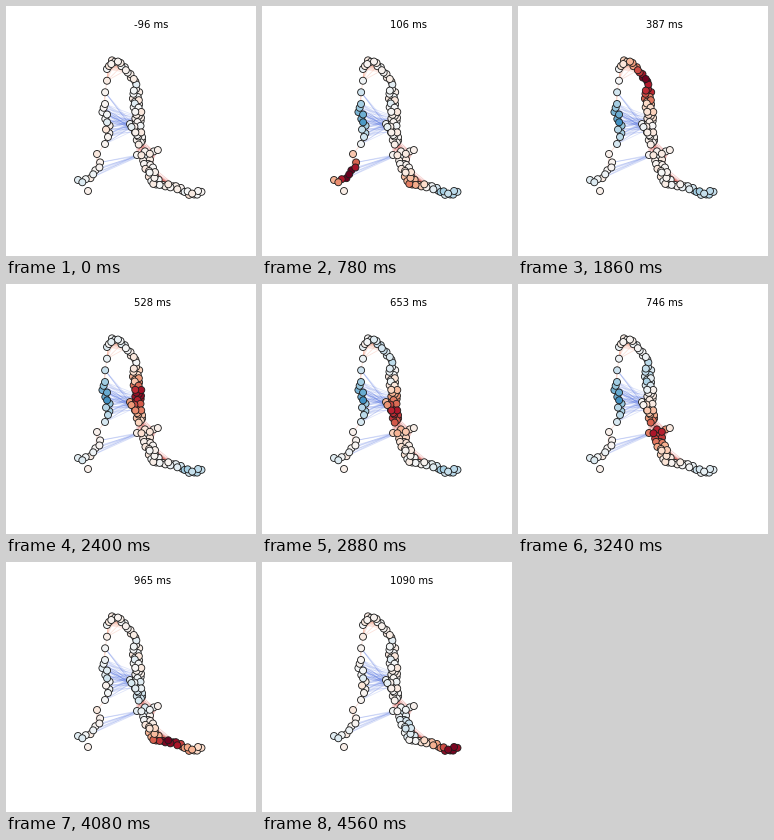
Animation, 250 px wide and 250 px high, one loop 4620 ms. Source, as a matplotlib script:

```python
import numpy as np
import matplotlib.pyplot as plt
from matplotlib.animation import FuncAnimation
from matplotlib.collections import LineCollection

SIZE = 250
FRAMES = 77
PX = 0.72  # points per pixel at 100 dpi
START_MS, STEP_MS = -96.875, 15.625

rng = np.random.default_rng(4)


def strand(count, spread, *corners):
    """Nodes at even steps along a polyline, zigzagging to both sides."""
    corners = np.array(corners, float)
    lengths = np.hypot(*np.diff(corners, axis=0).T)
    marks = np.concatenate([[0], lengths.cumsum()])
    steps = np.linspace(0, marks[-1], count)
    line = np.column_stack([np.interp(steps, marks, corners[:, k]) for k in (0, 1)])
    direction = np.gradient(line, axis=0)
    direction /= np.hypot(*direction.T)[:, None]
    normal = direction[:, ::-1] * [-1, 1]
    return line + normal * (spread * np.sin(2.4 * np.arange(count)))[:, None]


# Stage pixels, y pointing down
foot = strand(8, 1.2, (72, 174), (78, 176), (87, 169), (95, 157))
stray = np.array([[82.0, 185.0]])
shin = strand(2, 0, (91, 148), (99, 138))
knee = strand(9, 2, (102, 131), (102, 118), (97, 102))
thigh = strand(4, 0, (99, 98), (99, 87), (101, 75), (101, 63))
arch = strand(15, 1, (103, 60), (107, 54.5), (113, 56), (121, 65), (131, 78))
column = strand(36, 3.2, (130, 83), (130, 98), (133, 110), (131, 122), (135, 138))
hub = strand(4, 1, (124, 118), (130, 126))
shelf = strand(6, 1.8, (131, 149), (140, 147), (152, 145))
slope = strand(19, 4, (139, 152), (145, 166), (151, 180))
tail = strand(17, 1.5, (157, 179), (170, 181), (182, 187), (188, 189), (195, 185))

nodes = rng.permutation(np.vstack([
    foot, stray, shin, knee, thigh, arch, column, hub, shelf, slope, tail]))

# Position of each node along the course of the travelling wave
course = np.array([
    (72, 174), (88, 167), (97, 152), (101, 125), (98, 100), (102, 62),
    (112, 55), (128, 74), (131, 95), (132, 111), (132, 130), (139, 148),
    (149, 162), (149, 179), (170, 182), (190, 188)], float)
stops = np.arange(len(course))
fine = np.linspace(0, stops[-1], 1500)
fine_xy = np.column_stack([np.interp(fine, stops, course[:, k]) for k in (0, 1)])
gaps = np.hypot(*(nodes[:, None] - fine_xy[None]).transpose(2, 0, 1))
along = fine[gaps.argmin(axis=1)]
closeness = np.exp(-(gaps.min(axis=1) / 10) ** 4)
jitter = rng.normal(0.03, 0.05, len(nodes))


def pulse(x, centre, width):
    return np.exp(-((x - centre) / width) ** 2)


def ramp(ms, begin, end):
    x = np.clip((ms - begin) / (end - begin), 0, 1)
    return x * x * (3 - 2 * x)


def activity(ms):
    centre = np.interp(ms, [-97, 106, 262, 528, 653, 840, 1090],
                       [0, 0.9, 5.4, 9, 9.9, 12.1, 15.2])
    height = np.interp(ms, [-97, 106, 700, 1090], [0, 0.85, 0.45, 0.75])
    crest = height * pulse(along, centre, 0.85)
    halo = 0.25 * ramp(ms, -97, 106) * pulse(along, centre, 1.7)
    heel = 0.45 * pulse(along, 13, 0.6) * pulse(ms, 106, 110)

    knee_dip = ramp(ms, -97, 90) * (1 - ramp(ms, 750, 1050))
    tail_dip = ramp(ms, -97, 90) * (1 - ramp(ms, 650, 850))
    dips = (0.5 * knee_dip * pulse(along, 3.5, 1)
            + 0.33 * tail_dip * pulse(along, 14.7, 0.8)
            + 0.24 * ramp(ms, 400, 650) * pulse(along, centre - 3.2, 1)
            + 0.2 * pulse(along, 0, 0.4))
    return (crest + halo + heel - dips) * closeness + jitter


def near_pairs(points, reach):
    return [(a, b) for i, a in enumerate(points) for b in points[i + 1:]
            if np.hypot(*(a - b)) < reach]


def cross_pairs(first, second, keep):
    return [(a, b) for a in first for b in second if rng.random() < keep]


fig = plt.figure(figsize=(2.5, 2.5), dpi=100, facecolor="white")
ax = fig.add_axes([0, 0, 1, 1])
ax.set_xlim(0, SIZE)
ax.set_ylim(SIZE, 0)
ax.axis("off")


def add_edges(pairs, color, alpha):
    ax.add_collection(LineCollection(pairs, colors=color, alpha=alpha,
                                     linewidths=0.8 * PX, zorder=1))


red, salmon, blue = "#d6453d", "#f08a6c", "#5a78e4"

add_edges(near_pairs(np.vstack([foot, shin, knee, thigh]), 17), salmon, 0.3)
add_edges(near_pairs(np.vstack([thigh[-2:], arch]), 22), salmon, 0.25)
add_edges(near_pairs(np.vstack([column, hub]), 14), red, 0.25)
add_edges(near_pairs(np.vstack([column[-8:], shelf, slope]), 17), red, 0.3)
add_edges(near_pairs(tail, 14), salmon, 0.35)
add_edges(cross_pairs(slope[6:], tail[:6], 0.8), red, 0.25)

targets = np.vstack([hub, column[18:28]])
add_edges(cross_pairs(np.vstack([shin[1:], knee, thigh[:2]]), targets, 0.4), blue, 0.2)
add_edges(cross_pairs(foot[3:], shelf[:2], 0.7), blue, 0.25)

dots = ax.scatter(nodes[:, 0], nodes[:, 1], s=(7 * PX) ** 2, c=activity(START_MS),
                  cmap="RdBu_r", vmin=-1, vmax=1, edgecolors="#1c1c1c",
                  linewidths=0.85 * PX, zorder=2)
label = ax.text(128.2, 22, "", fontsize=10 * PX, family="DejaVu Sans",
                ha="left", va="baseline", color="black")


def update(i):
    ms = START_MS + STEP_MS * i
    dots.set_array(activity(ms))
    label.set_text(f"{int(ms)} ms")
    return dots, label


anim = FuncAnimation(fig, update, frames=FRAMES, interval=60,
                     repeat=True, repeat_delay=0)
plt.show()
```
